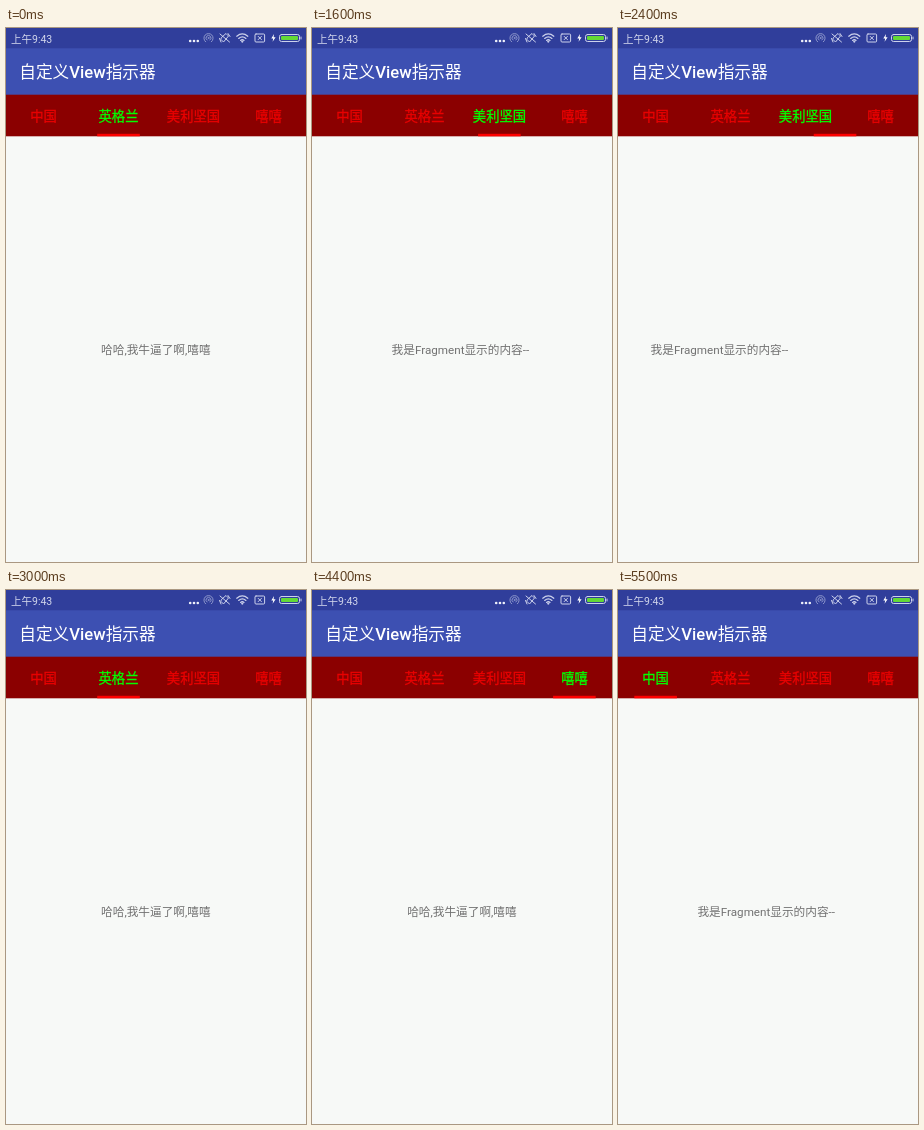
Write an HTML page that moves like this. It is 300 px wide and 534 px high and loops after 7 s.

```html
<!DOCTYPE html>
<html lang="zh-CN">
<head>
<meta charset="utf-8">
<title>Tab indicator</title>
<style>
  html, body { margin: 0; width: 100%; height: 100%; overflow: hidden; background: #f7f9f7; }
  svg { display: block; width: 100vw; height: 100vh; }
  text { font-family: Roboto, "Noto Sans CJK SC", "Noto Sans CJK JP", "Noto Sans CJK", sans-serif; white-space: pre; }
  .clock { font-size: 10.5px; fill: #d3d7ec; }
  .title { font-size: 16.67px; fill: #fff; }
  .title tspan { font-weight: 500; }
  .tab { font-size: 13.33px; text-anchor: middle; stroke-width: .3; }
  .page { font-size: 11.67px; fill: #727272; }
  .icons { fill: none; stroke: #cdd2ec; stroke-width: 1; stroke-linecap: round; stroke-linejoin: round; }
</style>
</head>
<body>
<svg id="stage" viewBox="0 0 300 534">
  <rect width="300" height="534" fill="#f7f9f7"/>
  <g id="pages"></g>

  <rect width="300" height="67" fill="#3d50b2"/>
  <rect width="300" height="20.3" fill="#303e9b"/>
  <text class="clock" x="5" y="14.6">上午9:43</text>
  <g class="icons">
    <g fill="#eef0fa" stroke="none">
      <circle cx="184.2" cy="13" r="1.3"/>
      <circle cx="188" cy="13" r="1.3"/>
      <circle cx="191.8" cy="13" r="1.3"/>
    </g>
    <g stroke="#8f98cc">
      <path d="M199.6 13.8A4.6 4.6 0 1 1 205.4 13.8"/>
      <path d="M201 12A2.5 2.5 0 1 1 204 12"/>
      <circle cx="202.5" cy="10" r=".5"/>
    </g>
    <path d="M216 9L220 5.5L222.5 8L217.5 14L215 11.5ZM214 6L223.5 14M213.5 10.5L215 14M222 5.5L224 8.5"/>
    <g stroke-width="1.3">
      <path d="M230.8 8.2Q236.3 3.6 241.8 8.2M232.7 10.4Q236.3 7.4 239.9 10.4M234.6 12.4Q236.3 11 238 12.4"/>
      <circle cx="236.3" cy="13.6" r=".5"/>
    </g>
    <rect x="249" y="6" width="9.6" height="8" rx="1"/>
    <path d="M252.2 8.4L255.4 11.6M255.4 8.4L252.2 11.6"/>
    <path d="M268 6L265.3 10.4H267.2L266.6 13.8L269.6 9.3H267.6Z" fill="#fff" stroke="none"/>
    <rect x="273.5" y="6.5" width="20" height="7" rx="2"/>
    <rect x="275" y="8" width="17" height="4" rx="1" fill="#63d936" stroke="none"/>
    <path d="M295 9V11"/>
  </g>
  <text class="title" x="13.3" y="50.2">自定义<tspan>View</tspan>指示器</text>

  <rect y="66.7" width="300" height="41.6" fill="#8b0000"/>
  <g id="tabs"></g>
  <rect id="indicator" y="105.8" width="42.6" height="2.5" fill="#f00"/>
</svg>
<script>
const LOOP = 7000, WIDTH = 300, TAB = 75, START = 1;
const labels = ['中国', '英格兰', '美利坚国', '嘻嘻'];
const contents = [
  { x: 79.5, text: '我是Fragment显示的内容--' },
  { x: 95.1, text: '哈哈,我牛逼了啊,嘻嘻' }
];

// A tap recolours the label at once; the page scrolls a little later
// and the indicator trails the page by "lag" milliseconds.
const taps = [
  { to: 2, tap: 1400, scroll: 1440 },
  { to: 3, tap: 1900, scroll: 1940 },
  { to: 2, tap: 2300, scroll: 2339, lag: 28 },
  { to: 1, tap: 2800, scroll: 2818 },
  { to: 0, tap: 3200, scroll: 3268 },
  { to: 2, tap: 3700, scroll: 3780, lag: 14.6 },
  { to: 3, tap: 4200, scroll: 4240 },
  { to: 1, tap: 4700, scroll: 4740 },
  { to: 0, tap: 5300, scroll: 5338 }
];

function addText(parent, className, x, y, content) {
  const node = document.createElementNS('http://www.w3.org/2000/svg', 'text');
  node.setAttribute('class', className);
  node.setAttribute('x', x);
  node.setAttribute('y', y);
  node.textContent = content;
  return document.getElementById(parent).appendChild(node);
}

const tabs = labels.map((label, i) => addText('tabs', 'tab', TAB * (i + .5), 93, label));
const pages = labels.map((_, i) => {
  const { x, text } = contents[i % 2];
  return addText('pages', 'page', x, 326, text);
});
const indicator = document.getElementById('indicator');

const easeOutQuint = p => 1 - (1 - p) ** 5;

function positionAt(time, trailing) {
  let position = START;
  for (const { to, scroll, lag = 16 } of taps) {
    const elapsed = time - scroll - (trailing ? lag : 0);
    if (elapsed <= 0) break;
    const distance = to - position;
    const duration = (Math.abs(distance) + 1) * 100;
    if (elapsed < duration) return position + distance * easeOutQuint(elapsed / duration);
    position = to;
  }
  return position;
}

function selectedAt(time) {
  return taps.reduce((current, { to, tap }) => time >= tap ? to : current, START);
}

function render(time) {
  const position = positionAt(time, false);
  const selected = selectedAt(time);
  pages.forEach((page, i) => page.setAttribute('x', contents[i % 2].x + WIDTH * (i - position)));
  tabs.forEach((tab, i) => {
    const color = i === selected ? '#0f0' : '#e80000';
    tab.setAttribute('fill', color);
    tab.setAttribute('stroke', color);
  });
  indicator.setAttribute('x', 16.2 + TAB * positionAt(time, true));
}

const begin = performance.now();
function tick() {
  render((performance.now() - begin) % LOOP);
  requestAnimationFrame(tick);
}
tick();
</script>
</body>
</html>
```
